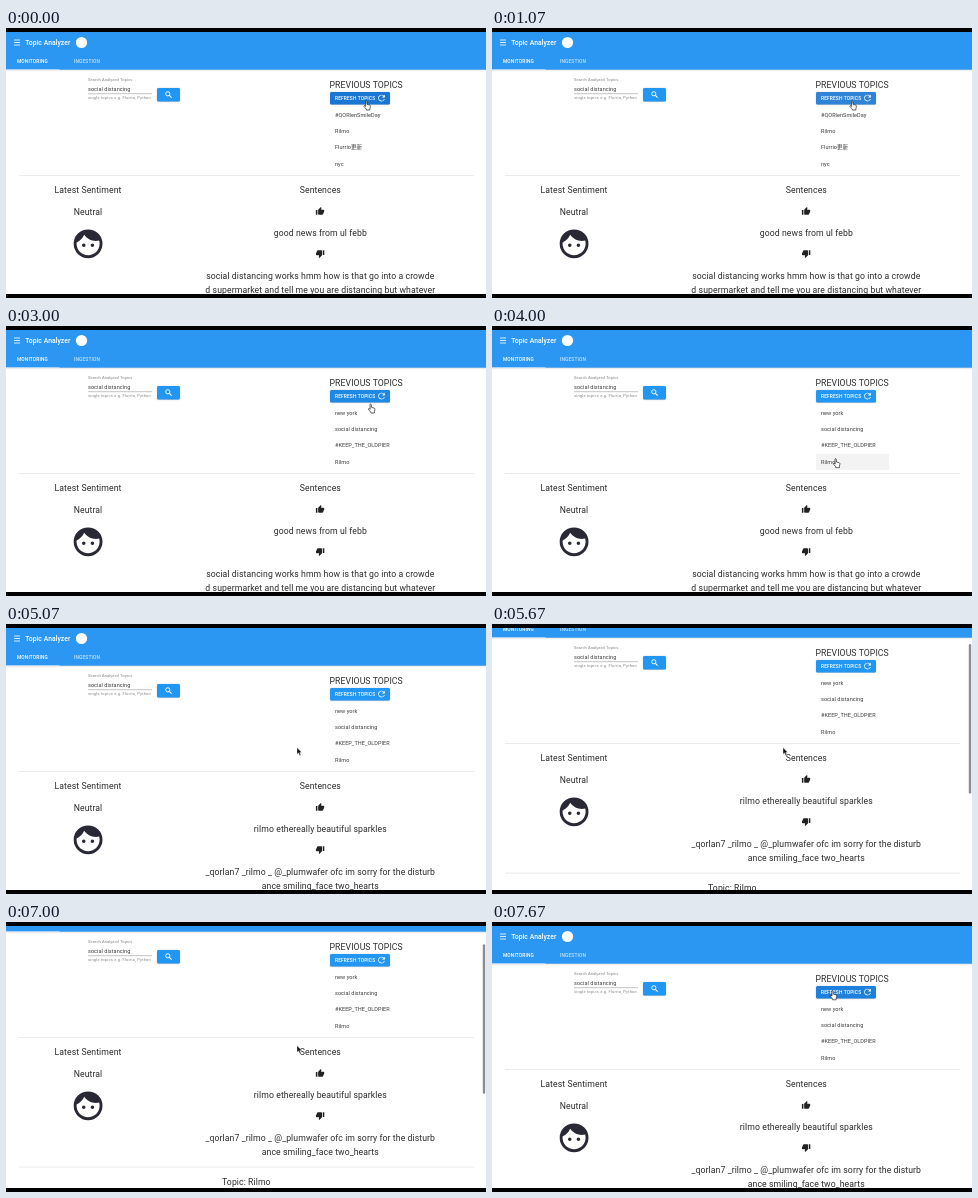
Write an HTML page that moves like this. It is 480 by 270 pixels and loops after 8 s.

```html
<!DOCTYPE html>
<html lang="en">
<head>
<meta charset="utf-8">
<title>Topic Analyzer</title>
<style>
html, body { margin: 0; width: 100%; height: 100%; overflow: hidden; background: #000; }
svg { display: block; width: 100vw; height: 100vh; }
text { font: 400 8.7px Roboto, "Noto Sans CJK JP", sans-serif; letter-spacing: .0094em; fill: #2c2c2c; white-space: pre; }
.mid { text-anchor: middle; }
.title { font-size: 6.8px; font-weight: 500; letter-spacing: .0075em; fill: #fff; }
.caps { font-size: 4.83px; font-weight: 500; letter-spacing: .0286em; fill: #fff; }
.item { font-size: 5.52px; fill: #3c3c3c; }
.hint { font-size: 4.14px; fill: #858585; }
.helper { letter-spacing: .0333em; }
.rule { fill: #e2e2e2; }
.shadow { filter: drop-shadow(0 .6px .6px rgba(0, 0, 0, .28)) drop-shadow(0 .3px .8px rgba(0, 0, 0, .14)); }
.bar { filter: drop-shadow(0 .8px .9px rgba(0, 0, 0, .25)); }
</style>
</head>
<body>
<svg viewBox="0 0 480 270">
  <defs>
    <clipPath id="screen"><rect y="4" width="480" height="262"/></clipPath>
    <clipPath id="buttonShape"><rect x="324" y="64" width="60" height="12.6" rx="1.7"/></clipPath>
    <path id="thumb" d="M23 10C23 8.9 22.1 8 21 8H14.7L15.6 3.4C15.7 2.9 15.5 2.3 15.2 2L14.2 1L7.6 7.6C7.2 8 7 8.5 7 9V19A2 2 0 0 0 9 21H18C18.8 21 19.5 20.5 19.8 19.8L22.9 12.7C23 12.5 23 12.3 23 12ZM1 21H5V9H1Z" fill="#222"/>
  </defs>
  <rect width="480" height="270"/>
  <g clip-path="url(#screen)">
    <rect width="480" height="270" fill="#fff"/>
    <g id="page">
      <g class="bar"><rect x="-5" width="490" height="41.7" fill="#2b97f3"/></g>
      <path d="M8 12H14M8 14.5H14M8 17H14" stroke="#fff" stroke-width=".8"/>
      <text class="title" x="19.3" y="17">Topic Analyzer</text>
      <circle cx="75.5" cy="14.5" r="5.6" fill="#fff"/>
      <text class="caps" x="11" y="35.2">MONITORING</text>
      <text class="caps" x="68" y="35.2" opacity=".72">INGESTION</text>
      <rect y="41" width="53.5" height=".7" fill="#fff" opacity=".65"/>

      <text class="hint" x="82" y="53">Search Analyzed Topics</text>
      <text class="item" x="82" y="62.5">social distancing</text>
      <rect x="82" y="65.6" width="64" height=".5" fill="#888"/>
      <text class="hint helper" x="82" y="71.3">single topics e.g. Flurrio, Python</text>
      <rect class="shadow" x="151" y="60" width="23" height="13.4" rx="1.5" fill="#2196f3"/>
      <path d="M163.4 67.4L165.6 69.6" stroke="#fff" stroke-width="1.1"/>
      <circle cx="161.8" cy="65.8" r="2.1" fill="none" stroke="#fff" stroke-width=".9"/>

      <text x="323.5" y="59.8">PREVIOUS TOPICS</text>
      <rect id="button" class="shadow" x="324" y="64" width="60" height="12.6" rx="1.5"/>
      <g clip-path="url(#buttonShape)"><circle id="ripple" cx="360" cy="71" fill="#fff"/></g>
      <text class="caps" x="329" y="71.8">REFRESH TOPICS</text>
      <path transform="translate(370.5 65) scale(.42)" fill="#fff" d="M17.65 6.35A8 8 0 1 0 19.73 14H17.65A6 6 0 1 1 16.22 7.78L13 11H20V4Z"/>
      <rect id="hover" x="324" y="127.7" width="73" height="16.2" fill="#f3f3f3"/>
      <g id="topics"></g>

      <rect class="rule" x="13" y="147" width="455" height=".7"/>
      <text class="mid" x="82" y="165.1">Latest Sentiment</text>
      <text class="mid" x="82" y="187">Neutral</text>
      <path transform="translate(64.8 198.5) scale(1.44)" fill="#292936" fill-rule="evenodd" d="M2 12A10 10 0 1 0 22 12A10 10 0 1 0 2 12ZM12 20C7.59 20 4 16.41 4 12C4 11.71 4 11.42 4.05 11.14C6.41 10.09 8.28 8.16 9.26 5.77C11.07 8.33 14.05 10 17.42 10C18.2 10 18.95 9.91 19.67 9.74C19.88 10.45 20 11.21 20 12C20 16.41 16.41 20 12 20ZM7.75 13a1.25 1.25 0 1 0 2.5 0a1.25 1.25 0 1 0-2.5 0ZM13.75 13a1.25 1.25 0 1 0 2.5 0a1.25 1.25 0 1 0-2.5 0Z"/>
      <text class="mid" x="314.3" y="165.1">Sentences</text>
      <use href="#thumb" transform="translate(309.5 178.7) scale(.38)"/>
      <use href="#thumb" transform="translate(318.7 230.3) scale(-.38)"/>
      <g id="sentences"></g>
      <rect class="rule" x="13" y="276.7" width="455" height=".7"/>
      <text x="216" y="295.1">Topic: Rilmo</text>
    </g>
    <rect id="thumbBar" x="476.8" width="2.4" height="149.5" rx="1.2" fill="#808080"/>
  </g>
  <path id="arrow" d="M0 0V6.7L1.6 5.3L2.7 7.9L3.9 7.4L2.8 4.9H4.8Z" fill="#111" stroke="#fff" stroke-width=".4"/>
  <path id="hand" d="M2 .6C2.1-.2 3.2-.2 3.3.6L3.5 3.3L5.9 4C6.8 4.2 7 4.8 6.9 5.6L6.4 7.4V9H2.8V8.2L.4 5.4C.1 4.7.9 4.3 1.5 4.8L2.2 5.4Z" fill="#fff" stroke="#111" stroke-width=".65"/>
</svg>
<script>
const DURATION = 8000;
const $ = id => document.getElementById(id);

const LISTS = [
  ["#QORlenSmileDay", "Rilmo", "Flurrio更新", "nyc"],
  ["new york", "social distancing", "#KEEP_THE_OLDPIER", "Rilmo"],
];
const SENTENCES = [
  ["good news from ul febb",
   "social distancing works hmm how is that go into a crowde",
   "d supermarket and tell me you are distancing but whatever"],
  ["rilmo ethereally beautiful sparkles",
   "_qorlan7 _rilmo _ @_plumwafer ofc im sorry for the disturb",
   "ance smiling_face two_hearts"],
];

// Each row: start time, then the values held until the next row.
const CURSOR = [
  [0, "hand", 357.5, 73],
  [1330, "hand", 364, 72], [1400, "hand", 374, 72], [1470, "arrow", 386, 73],
  [1530, "arrow", 394, 75], [1600, "arrow", 399, 76], [1670, "arrow", 401.7, 76.5],
  [2070, "arrow", 389, 75], [2130, "hand", 375, 68],
  [2270, "hand", 373, 67.5], [2330, "hand", 371, 67], [2400, "hand", 369, 67],
  [2470, "hand", 367, 67.5], [2530, "hand", 366, 68],
  [3000, "hand", 362, 78], [3070, "hand", 358, 88],
  [3330, "hand", 348, 120], [3400, "hand", 342, 131], [3670, "hand", 341, 132.7],
  [4200, "hand", 335, 133], [4270, "hand", 326, 133], [4330, "arrow", 313, 132],
  [4670, "arrow", 293.5, 127], [5000, "arrow", 291, 123.6],
  [7330, "arrow", 305, 111], [7400, "arrow", 330, 84], [7670, "hand", 337.8, 68.8],
];
const SCROLL = [
  [0, 0], [5330, 2], [5400, 6], [5470, 11], [5530, 17], [5600, 23], [5670, 28],
  [5730, 31], [5800, 33], [6000, 34], [6070, 35], [6130, 36], [6330, 35],
  [6670, 34], [7000, 32], [7330, 10], [7400, 0],
];
const BUTTON = [
  [0, "#1976d2"], [1470, "#1e88e5"], [1530, "#2196f3"], [2130, "#1e88e5"],
  [2270, "#1976d2"], [3000, "#1e88e5"], [3070, "#2196f3"], [7670, "#1d80dc"],
];
const RIPPLE = [[0, 0, 0], [330, 23, .25], [670, 62, .2], [1070, 62, .1], [1130, 0, 0]];
const HOVER = [[0, 0], [3330, .5], [3400, 1], [4270, .6], [4330, .3], [4670, 0]];
const LIST = [[0, 0], [1400, 1]];
const SENTENCE = [[0, 0], [5000, 1]];
const BAR = [[0, 0], [5330, .9], [7670, 0]];

const at = (steps, time) => steps.findLast(step => step[0] <= time).slice(1);

function addGroups(parent, groups, className, place) {
  return groups.map(lines => {
    const group = document.createElementNS("http://www.w3.org/2000/svg", "g");
    lines.forEach((line, i) => {
      const text = document.createElementNS(group.namespaceURI, "text");
      const [x, y] = place(i);
      text.setAttribute("class", className);
      text.setAttribute("x", x);
      text.setAttribute("y", y);
      text.textContent = line;
      group.append(text);
    });
    parent.append(group);
    return group;
  });
}

const lists = addGroups($("topics"), LISTS, "item", i => [329, 88.9 + 16.2 * i]);
const sentences = addGroups($("sentences"), SENTENCES, "mid", i => [314.3, [208.3, 251.3, 264.6][i]]);
const showOnly = (groups, index) =>
  groups.forEach((group, i) => group.setAttribute("visibility", i === index ? "visible" : "hidden"));

function draw(time) {
  const [scroll] = at(SCROLL, time);
  $("page").setAttribute("transform", `translate(0 ${-scroll})`);
  $("thumbBar").setAttribute("y", 4.4 + scroll * .56);
  $("thumbBar").setAttribute("opacity", at(BAR, time)[0]);

  $("button").setAttribute("fill", at(BUTTON, time)[0]);
  const [radius, alpha] = at(RIPPLE, time);
  $("ripple").setAttribute("r", radius);
  $("ripple").setAttribute("opacity", alpha);
  $("hover").setAttribute("opacity", at(HOVER, time)[0]);

  showOnly(lists, at(LIST, time)[0]);
  showOnly(sentences, at(SENTENCE, time)[0]);

  const [kind, x, y] = at(CURSOR, time);
  for (const id of ["arrow", "hand"]) {
    $(id).setAttribute("visibility", id === kind ? "visible" : "hidden");
    $(id).setAttribute("transform", `translate(${x} ${y})`);
  }
}

const start = performance.now();
function tick() {
  draw((performance.now() - start) % DURATION);
  requestAnimationFrame(tick);
}
tick();
</script>
</body>
</html>
```
